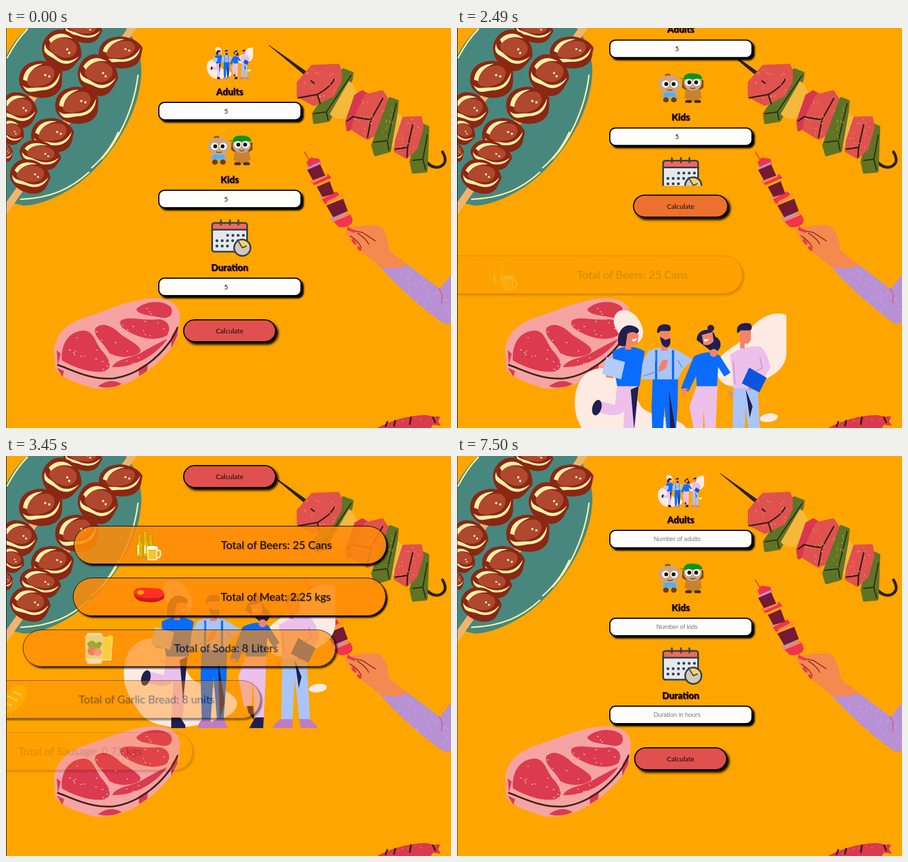
Recreate the animation shown at these times as an HTML page. Size 789 px wide and 710 px high, loop 7620 ms.

```html
<!DOCTYPE html>
<html lang="en">
<head>
<meta charset="utf-8">
<title>Barbecue calculator</title>
<style>
html, body { margin: 0; width: 100%; height: 100%; overflow: hidden; background: #ffa500; }
#stage { position: relative; width: 789px; height: 710px; overflow: hidden; font-family: Lato, sans-serif; color: #0c0a08; }
#stage div, svg { position: absolute; }
svg { left: 0; top: 0; overflow: visible; }
#edge { left: 0; top: 0; width: 1px; height: 710px; }
#form { left: 0; top: 0; width: 789px; overflow: hidden; }
#fields, #page, #lower { left: 0; top: 0; width: 789px; height: 710px; }
.title { left: 296.5px; width: 200px; text-align: center; font: 800 16.5px/20px Lato, sans-serif; text-shadow: 1px 1px 1px #5a1010; }
.input { box-sizing: border-box; height: 33px; border: 2px solid #000; border-radius: 11px; background: #fffefd; box-shadow: 4px 4px 3px #000; text-align: center; line-height: 29px; padding-right: 13px; }
.value { font-size: 12px; }
.hint { font: 10.9px/29px "Liberation Sans", Arial, sans-serif; color: #757575; }
#button { box-sizing: border-box; top: 517px; height: 41px; border: 2px solid #000; border-radius: 25px; box-shadow: 4px 4px 4px #000; text-align: center; font-size: 12.1px; line-height: 38px; white-space: nowrap; }
.card { box-sizing: border-box; left: 120px; width: 555px; border: 1px solid #000; border-radius: 34px; background: rgba(255,140,10,.86); box-shadow: 3px 3px 3px #000; }
.card svg { left: -1px; top: -1px; }
.card div { top: 0; font-size: 19.5px; white-space: nowrap; text-shadow: 1px 1px 2px rgba(0,0,60,.4); }
#scroll { left: 778px; top: 0; width: 15px; height: 710px; background: #f1f1f1; }
#thumb { left: 2px; top: 14px; width: 11px; background: #c1c1c1; }
#arrow { left: 3px; top: 5px; border: 4px solid transparent; border-top: 0; border-bottom: 4px solid #777; }
</style>
</head>
<body>
<div id="stage">
<svg id="back" width="789" height="710" stroke-linecap="round" stroke-linejoin="round">
  <defs>
    <g id="ball">
      <path fill="#8b2713" d="M-36 4C-39-14-27-34-6-33 8-36 34-22 38-3 33 10 34 25 16 31-2 36-30 26-36 4Z"/>
      <path fill="#b0472f" d="M-24-4C-18-22 6-27 20-19 31-10 24 5 10 9-6 12-26 9-24-4Z"/>
      <path fill="#fbf0a6" d="M-32 1C-26 11-18 8-6 12 10 17 23 13 34-4 29 14 16 22-2 18-18 15-29 20-32 1ZM-29-8C-23-25-8-31 10-26-8-24-18-17-23-4Z"/>
      <path stroke="#fbf0a6" stroke-width="4" d="M9-6h0M15-2h0"/>
    </g>
    <g id="people">
      <g fill="#fdebe3">
        <path d="M278 345C282 325 302 324 318 340 332 358 334 376 322 386 304 392 276 368 278 345Z"/>
        <path d="M209 490C210 455 230 430 262 432 300 436 310 474 328 502 348 522 402 516 410 546 408 572 375 576 352 582 310 596 252 590 235 560 218 535 208 520 209 490Z"/>
        <path d="M584 338C560 328 530 345 515 370 495 400 460 400 460 435 462 470 500 468 530 460 565 445 584 430 584 404Z"/>
        <ellipse cx="553" cy="520" rx="16" ry="7.5" transform="rotate(-8 553 520)"/>
      </g>
      <g fill="#ecc0ea">
        <path d="M284 463H303L298 506C288 520 270 516 252 511L256 491 280 497Z"/>
        <path d="M299 463H322L313 575H293Z"/>
        <path d="M425 463H462L457 575H442L437 505 436 550 422 553 412 500Z"/>
        <path d="M484 408Q510 390 538 394 548 400 556 430L533 470H490L488 440Z"/>
      </g>
      <path fill="#0a6cff" d="M276 402Q305 386 333 402L328 430 324 464H284L277 425ZM347 450H392L391 500 386 575H374L368 500 363 575H347L345 500ZM420 411Q450 397 466 410L485 440 474 447 463 430 461 464H425L424 446 410 474 397 468Z"/>
      <path fill="#a9c5f8" d="M340 401Q368 390 390 400L418 417 402 432 391 452H346L327 452 329 423ZM490 468H533L539 575H520L512 502 508 575H488Z"/>
      <path fill="none" stroke="#0a6cff" stroke-width="4" d="M353 400V452M383 400V452"/>
      <g fill="#1f1f52">
        <path d="M286 392C282 365 298 350 315 358 328 364 322 372 312 372L308 394ZM293 572H309L318 586V591H293ZM442 572H457L456 591H431ZM427 552H438L440 577 430 564ZM512 470L524 500 519 520ZM308 470L322 464 314 540ZM376 470L388 545 379 575Z"/>
        <ellipse cx="248" cy="502" rx="8" ry="14" transform="rotate(15 248 502)"/>
        <path d="M355 370C353 355 366 351 377 356 381 362 378 367 375 367L360 368ZM425 382C425 360 455 358 458 376 474 384 468 406 452 403Z"/>
        <circle cx="450" cy="361" r="6"/>
        <path d="M497 370C494 354 505 350 520 353 526 360 520 367 518 365L503 366Z"/>
      </g>
      <g fill="#f4826b">
        <path d="M302 371Q312 364 322 373L320 388Q315 393 309 390L309 399H298ZM360 366H376L378 383 373 401H362ZM434 373L453 368 455 384Q447 394 437 390ZM502 365H521V382Q517 391 510 388V397H502Z"/>
        <path d="M357 432L364 418 374 417 371 432 360 438Z"/><circle cx="455" cy="405" r="7"/>
        <path d="M264 438L276 443 278 450 264 448ZM397 468H409L403 483ZM516 458L530 464 532 471 517 470ZM480 472L489 474 486 487Z"/>
      </g>
      <path fill="none" stroke="#7390c8" stroke-width="1.500" d="M331 446L360 436M399 431L392 418M352 402V420"/>
      <path fill="#1f1f52" d="M360 376L369 382 378 379Q380 394 371 395 362 394 360 376Z"/>
      <path fill="#b4ccfa" d="M265 412L298 421 291 452 257 442Z"/>
      <path fill="#0a55df" d="M518 431L549 449 536 475 505 459Z"/>
      <path fill="none" stroke="#c08fc4" stroke-width="1.500" d="M537 412L541 432 528 438M490 420L493 460"/>
      <path fill="#fff" d="M310 381L319 379Q317 386 311 384ZM438 381L447 380Q443 387 438 384Z"/>
      <path fill="#c07dbd" d="M340 591Q341 579 351 574H363V582L374 574H386L393 591ZM473 591Q475 582 488 575H508V591ZM519 575H538L551 586V591H523Z"/>
    </g>
    <g id="icon0">
      <path fill="#e6b40c" stroke="#b08c10" d="M234 137h5v14l4 6v22h-12v-22l3-6ZM244 133h6v17l4 6v23h-11v-23l1-6ZM254 139h5v13l3 6v20h-9Z"/>
      <path fill="#fff0a0" d="M233 158h3v17h-3ZM245 158h3v15h-3Z"/>
      <path fill="none" stroke="#fff0b0" stroke-width="3" d="M267 167q8-1 7 7t-7 6"/>
      <path fill="#f5c52c" stroke="#fff3cf" stroke-width="2" d="M251 164h17l-1 20h-15Z"/>
      <path stroke="#fff" stroke-width="6" d="M253 163h13"/>
    </g>
    <g id="icon1">
      <path fill="#c81c1c" d="M228 243L282 244V252Q272 262 250 259 228 258 228 243Z"/>
      <path fill="#ff3029" d="M228 242C229 231 252 234 270 235 286 237 284 252 268 252 246 253 229 251 228 242Z"/>
      <ellipse cx="240" cy="242" rx="6" ry="4" fill="#ffb400"/>
      <path stroke="#f0a000" stroke-width="2" d="M219 265h9M232 265h32M269 265h11"/>
    </g>
    <g id="icon2">
      <path fill="#f9d94a" stroke="#fff0a0" stroke-width="2" d="M261 322h18l-3 40h-14Z"/>
      <circle cx="275" cy="323" r="5" fill="#ffe64d"/>
      <path fill="#e8dca0" d="M235 314h24l4 6v42l-4 7h-24l-4-7v-42Z"/>
      <path fill="#f5f0d6" d="M236 314h22l2 4h-26ZM234 360h26l-2 8h-22Z"/>
      <path fill="#7cae3c" d="M234 333q9-10 16 0 6-7 11 0l-5 9h-18Z"/>
      <circle cx="243" cy="346" r="8" fill="#ee7276"/><circle cx="253" cy="348" r="7" fill="#f59a8e"/>
    </g>
    <g id="icon3" transform="rotate(-48 236 432)">
      <ellipse cx="236" cy="432" rx="31" ry="17" fill="#ffb300"/>
      <path fill="none" stroke="#ffe39a" stroke-width="4" d="M221 425l5 12M234 422l5 16M247 424l4 12"/>
    </g>
    <g id="icon4">
      <path fill="none" stroke="#b91a1a" stroke-width="15" d="M223 535Q252 535 260 511"/>
      <path fill="none" stroke="#f52c22" stroke-width="12" d="M222 533Q247 530 258 509"/>
      <path fill="none" stroke="#ff9a86" stroke-width="2" d="M224 528Q242 525 251 511"/>
      <path stroke="#e8261f" stroke-width="4" d="M263 504l4-3M216 538l-5 2"/>
      <path stroke="#f0a000" stroke-width="2" d="M210 541h18M233 545h24M238 540h32"/>
    </g>
  </defs>

  <!-- plate -->
  <path fill="#48877d" d="M0 50Q15 20 38 0H212Q240 33 240 78C238 160 175 245 120 282 85 305 50 316 30 315L0 308Z"/>
  <path fill="none" stroke="#fbf0a6" stroke-width="2.5" d="M2 53Q18 22 38 2M234 84C226 150 195 205 170 232M199 185Q182 222 152 248M26 304C80 302 115 285 147 256"/>
  <path stroke="#f0b56d" stroke-width="13" stroke-linecap="butt" d="M232-12L-6 330M153-20L-5 195"/>
  <g id="balls"></g>

  <!-- pepper kebab -->
  <path fill="#2b2118" d="M466 30L548 88 543 95 466 31Z"/>
  <path fill="none" stroke="#2b2118" stroke-width="5" d="M745 237Q757 251 770 246 785 239 774 220"/>
  <g stroke-width="5">
    <path fill="#5f7425" stroke="#5f7425" d="M598 74L614 80 612 92 572 164 547 168 545 152Z"/>
    <path fill="none" stroke="#2b2a12" stroke-width="2" d="M546 152L568 149 612 84M568 149L571 163"/>
    <path fill="#f4b93a" d="M608 94C624 105 628 130 620 146 606 166 584 164 574 153Z"/>
    <path fill="#e0524f" stroke="#e0524f" d="M543 68L589 66 593 76 593 94 580 119 546 136 518 121 518 97Z"/>
    <path fill="none" stroke="#2b2118" stroke-width="2.5" d="M518 124L552 118Q575 105 582 91M552 118L557 134M541 94L546 98"/>
    <path fill="#d93750" stroke="#d93750" d="M632 113L640 118 630 168 606 181 604 166 620 120Z"/>
    <path fill="#f4b93a" d="M690 148C714 160 718 188 710 201 700 216 684 212 672 204Z"/>
    <path fill="#e0524f" stroke="#e0524f" d="M638 120L667 113 678 130 672 180 641 196 615 180 618 162Z"/>
    <path fill="none" stroke="#2b2118" stroke-width="2.5" d="M617 158L647 163 668 125M647 163L641 194M605 165L616 157"/>
    <path fill="#5f7425" stroke="#5f7425" d="M681 125L694 130 692 150 680 218 655 225 650 208Z"/>
    <path fill="none" stroke="#2b2a12" stroke-width="2" d="M652 203L676 200 692 134M676 200L679 217"/>
    <path fill="#5f7425" stroke="#5f7425" d="M735 170L748 176 745 254 722 256 718 237Z"/>
    <path fill="none" stroke="#2b2a12" stroke-width="2" d="M721 235L739 233 747 190M739 233L744 252"/>
    <path fill="#e0524f" stroke="#e0524f" d="M705 160L735 159 738 176 727 214 710 230 690 218 692 200Z"/>
    <path fill="none" stroke="#2b2118" stroke-width="2.5" d="M690 215L712 212 721 172M712 212L711 229"/>
  </g>

  <!-- hand with skewer -->
  <path stroke="#d9502b" stroke-width="2" d="M529 220L541 240M600 345L614 362"/>
  <path fill="#f0344f" d="M533 238L540 230 555 232 559 241 538 251ZM540 272L571 259 577 266 547 279ZM560 304L586 290 591 296 566 313ZM581 344L607 328Q619 340 612 348 600 356 590 353Z"/>
  <path fill="none" stroke="#b791d4" stroke-width="4" d="M536 249L556 240M558 300L578 291M577 339L602 330"/>
  <path fill="none" stroke="#f48a4f" stroke-width="4" d="M542 274L568 262M571 309L596 297M580 342L607 331"/>
  <path fill="#741a35" d="M534 252L557 242 566 262 544 270ZM551 282L574 272 582 294 561 300ZM568 315L598 303 606 325 580 336Z"/>
  <path fill="#b791d4" d="M663 423L713 421 769 463 789 438V523L779 526C745 505 690 455 663 423Z"/>
  <path fill="#f48a4f" d="M602 362C608 351 640 349 659 350 673 357 677 375 680 395L713 421C700 428 674 427 663 424 648 410 632 401 622 388 612 379 606 372 602 362Z"/>
  <path fill="none" stroke="#8e2b24" stroke-width="1.5" d="M608 358L632 363 655 378M610 369Q625 378 630 390M623 364Q640 375 643 384"/>
  <path fill="none" stroke="#f0344f" stroke-width="5" d="M607 357L617 361M615 377L619 382M625 390L628 393"/>
  <path fill="none" stroke="#e0506e" stroke-width="1.5" d="M768 463Q776 474 772 488"/>

  <!-- steak -->
  <path fill="#f6a3a3" d="M86 582C83 553 98 528 139 514 180 502 215 482 262 480 290 480 308 490 308 512L306 542C302 565 260 610 215 630 190 640 165 643 150 638 125 630 104 624 88 608Z"/>
  <g fill="#dc3a4f">
    <path d="M99 590C97 560 112 537 140 537 157 540 158 560 172 575 186 592 188 603 176 609 150 614 120 602 99 590Z"/>
    <path d="M159 532C172 521 190 530 205 545 225 558 246 569 236 577 222 586 198 586 183 577 175 560 152 546 159 532Z"/>
    <path d="M203 520C215 510 240 520 270 517 290 518 293 535 286 545 270 556 244 552 225 543 210 535 200 530 203 520Z"/>
    <path d="M231 499C245 485 275 481 292 495 298 508 290 517 275 514 255 510 233 509 231 499Z"/>
    <path d="M188 602C198 585 220 588 242 575 256 567 274 557 286 552 270 575 235 603 188 602ZM90 572L97 578 92 598ZM163 636Q185 620 205 632 184 642 163 636ZM293 548L305 528 304 546 293 568ZM235 604L252 594 250 609 236 618ZM90 603L103 609 100 619Z"/>
  </g>
  <path fill="none" stroke="#3a231c" stroke-width="3" d="M92 598C120 608 150 625 190 622 245 615 292 565 304 532"/>

  <!-- sausage -->
  <path fill="#d93a4d" d="M654 712C680 698 710 688 742 687 754 687 757 692 764 689L770 690 766 698 771 706 757 704 752 712Z"/>
  <path fill="none" stroke="#3a1a1c" stroke-width="3" d="M676 699L673 707M690 697L688 706M718 691L716 703M757 691L761 700"/>
  <g id="specks"></g>
</svg>
<div id="page">
  <div id="form"><div id="fields">
    <svg width="789" height="500" stroke-linecap="round" stroke-linejoin="round">
      <use href="#people" transform="translate(356 33) scale(.219) translate(-209 -327)"/>
      <!-- kids -->
      <path fill="none" stroke="#8a531c" stroke-width="3" d="M377 197q1-6-7-3"/>
      <path fill="#7a4b1d" d="M400 203h37v13l-7 5h-24l-7-5Z"/>
      <path fill="#c9822f" d="M406 219h25l3 16h-4v5h-23v-5h-4Z"/>
      <path fill="#c9a486" d="M366 221h22l6 13h-33Z"/>
      <ellipse cx="377" cy="210" rx="20" ry="15" fill="#c9a486"/><ellipse cx="418" cy="208" rx="16" ry="14" fill="#c9a486"/>
      <path fill="#4db3ee" d="M368 225h18l3 8h-24Z"/>
      <path stroke="#6b3f16" stroke-width="9" d="M370 238h1M384 238h1"/>
      <path stroke="#4a2a10" stroke-width="5" d="M407 241h7M423 241h7"/>
      <path fill="#0a9418" d="M402 200Q403 190 418 191 434 191 435 201L402 202 393 199Z"/>
      <path stroke="#fff" stroke-width="13" d="M370 210h0M385 210h0M411 207h0M425 207h0"/>
      <path stroke="#111" stroke-width="7" d="M371 210h0M384 210h0M412 207h0M424 207h0"/>
      <path fill="none" stroke="#6b3f16" stroke-width="1.5" d="M373 220q5 2 9 0M414 217q4 2 8 0"/>
      <!-- calendar -->
      <rect x="365.500" y="346" width="62" height="51" rx="4" fill="#e6e9ec"/>
      <path fill="#ee6a5b" d="M366 357V349Q366 346 370 346H424Q428 346 428 349V357Z"/>
      <rect x="365.500" y="346" width="62" height="51" rx="4" fill="none" stroke="#33424f" stroke-width="3"/>
      <path stroke="#33424f" stroke-width="3" d="M366 358H428M381 341V349M397 341V349M412 341V349"/>
      <path stroke="#33424f" stroke-width="5" stroke-dasharray="0 9.300" d="M393 368H424M374 377.500H416M374 387H398"/>
      <circle cx="419" cy="390" r="14.500" fill="#d5c7b8" stroke="#33424f" stroke-width="3"/>
      <path fill="#f8d35e" d="M419 390L413 378Q421 375 431 385Z"/>
      <path fill="none" stroke="#33424f" stroke-width="2" d="M413 380L419 390 426 387"/>
    </svg>
  </div></div>
  <div id="lower">
    <svg width="789" height="710"><use href="#people" y="393"/></svg>
    <div id="button"></div>
  </div>
</div>
<div id="scroll"><div id="arrow"></div><div id="thumb"></div></div>
<div id="edge"></div>
</div>
<script>
const LOOP = 7620, RESET = 6240, FULL = 791, FORM_HEIGHT = 501;
const $ = id => document.getElementById(id);

function add(parent, className, html, style = {}) {
  const el = document.createElement('div');
  el.className = className;
  el.innerHTML = html;
  Object.assign(el.style, style);
  parent.append(el);
  return el;
}

// x, y, half width, half height, turn
$('balls').innerHTML = [
  [135, 2, 35, 24, 10], [98, 40, 36, 35, 25], [62, 92, 39, 34, -15], [22, 146, 33, 31, 10], [8, 184, 25, 22, 30], [0, 222, 12, 16, 0],
  [203, 44, 39, 29, -8], [162, 84, 36, 36, 15], [126, 138, 39, 34, -15], [82, 191, 38, 31, -5], [60, 226, 37, 25, 12], [42, 264, 36, 30, 8]
].map(([x, y, w, h, turn]) =>
  `<use href="#ball" transform="translate(${x} ${y}) rotate(${turn}) scale(${w / 37} ${h / 33})"/>`).join('');

let seed = 7;
const random = () => (seed = seed * 16807 % 2147483647) / 2147483647;
function specks(x, y, w, h, turn, count, color, size) {
  let d = '';
  for (let i = 0; i < count; i++) {
    const a = random() * 2 * Math.PI, r = Math.sqrt(random());
    d += `M${(w * r * Math.cos(a)).toFixed(1)} ${(h * r * Math.sin(a)).toFixed(1)}l${(random() * 2).toFixed(1)} 1`;
  }
  return `<path d="${d}" stroke="${color}" stroke-width="${size}" transform="translate(${x} ${y}) rotate(${turn})"/>`;
}
$('specks').innerHTML =
  specks(198, 556, 100, 50, -25, 45, '#fbd9c8', 1.3) +
  specks(555, 98, 34, 28, 0, 22, '#f4a04a', 1.2) +
  specks(643, 155, 26, 36, 20, 20, '#f4a04a', 1.2) +
  specks(714, 190, 17, 30, 15, 14, '#f4a04a', 1.2) +
  specks(675, 175, 10, 42, 12, 14, '#c9a43a', 1.2) +
  specks(740, 470, 62, 22, 38, 70, '#cfb0e2', 1) +
  specks(715, 700, 38, 7, -12, 10, '#ee7a74', 1);

const fields = [['Adults', '5', 'Number of adults'], ['Kids', '5', 'Number of kids'], ['Duration', '5', 'Duration in hours']]
  .map(([title, value, hint], i) => {
    const top = 156 * i;
    add($('fields'), 'title', title, { top: top + 103 + 'px' });
    return { value, hint, el: add($('fields'), 'input', '', { top: top + 131 + 'px' }) };
  });

// label, text x, height, start time, slide distance
let cardTop = 124;
const cards = [
  ['Total of Beers: 25 Cans', 381, 68, 2215, 200],
  ['Total of Meat: 2.25 kgs', 382, 68, 2500, 300],
  ['Total of Soda: 8 Liters', 388, 66, 2780, 400],
  ['Total of Garlic Bread: 8 units', 352, 68, 2985, 400],
  ['Total of Sausage: 0.75 kgs', 365, 68, 3190, 400]
].map(([label, x, height, start, distance], i) => {
  const el = add($('lower'), 'card',
    `<svg width="555" height="68" stroke-linecap="round"><use href="#icon${i}" transform="translate(-120 ${-cardTop})"/></svg>
     <div style="left:${x - 121}px;line-height:${height - 2}px">${label}</div>`,
    { top: cardTop + FORM_HEIGHT + 'px', height: height + 'px' });
  cardTop += height + 24;
  return { el, start, distance };
});

// cubic-bezier(.42, 0, .58, 1)
function easeInOut(x) {
  if (x <= 0) return 0;
  if (x >= 1) return 1;
  const curve = (a, b, s) => 3 * a * s * (1 - s) ** 2 + 3 * b * s * s * (1 - s) + s ** 3;
  let low = 0, high = 1;
  for (let i = 0; i < 20; i++) {
    const mid = (low + high) / 2;
    if (curve(.42, .58, mid) < x) low = mid; else high = mid;
  }
  return curve(0, 1, low);
}

function draw(t) {
  const reset = t >= RESET;
  const ramp = (start, length) => easeInOut((t - start) / length);
  const collapse = reset ? 0 : FORM_HEIGHT * ramp(2025, 1000);
  const contentHeight = 898 - collapse, viewHeight = 725;
  const scrolling = !reset && t >= 2060 && contentHeight > viewHeight;
  const width = scrolling ? FULL - 14 : FULL;

  $('back').style.transformOrigin = '1px 0';
  $('back').style.transform = `scale(${width / FULL})`;
  $('page').style.transform = `translateX(${(width - FULL) / 2}px)`;
  $('form').style.height = FORM_HEIGHT - collapse + 'px';
  $('fields').style.transform = `translateY(${-collapse / 2}px)`;
  $('lower').style.transform = `translateY(${-collapse}px)`;
  $('scroll').style.display = scrolling ? '' : 'none';
  $('thumb').style.height = 697 * viewHeight / contentHeight + 'px';
  $('edge').style.background = t >= 1890 && t < 7500 ? '#1a1208' : '#5a4a38';

  for (const { el, value, hint } of fields) {
    const inputWidth = .321 * width;
    el.className = 'input ' + (reset ? 'hint' : 'value');
    el.textContent = reset ? hint : value;
    el.style.width = inputWidth + 'px';
    el.style.left = 396.7 - inputWidth / 2 + 'px';
  }

  const hover = ramp(920, 500) - ramp(2210, 500) + ramp(5195, 500) - ramp(6215, 500);
  const button = $('button');
  button.textContent = t >= 4050 && !reset ? 'Calculate Again?' : 'Calculate';
  button.style.width = 165 + 8 * hover + 'px';
  button.style.left = 314 - 4 * hover + 'px';
  button.style.background = `rgba(224,80,79,${1 - hover})`;

  for (const { el, start, distance } of cards) {
    const p = reset ? 0 : ramp(start, 1000);
    el.style.opacity = p;
    el.style.transform = `translateX(${-distance * (1 - p)}px)`;
  }
}

function tick() {
  draw(performance.now() % LOOP);
  requestAnimationFrame(tick);
}
tick();
</script>
</body>
</html>
```
